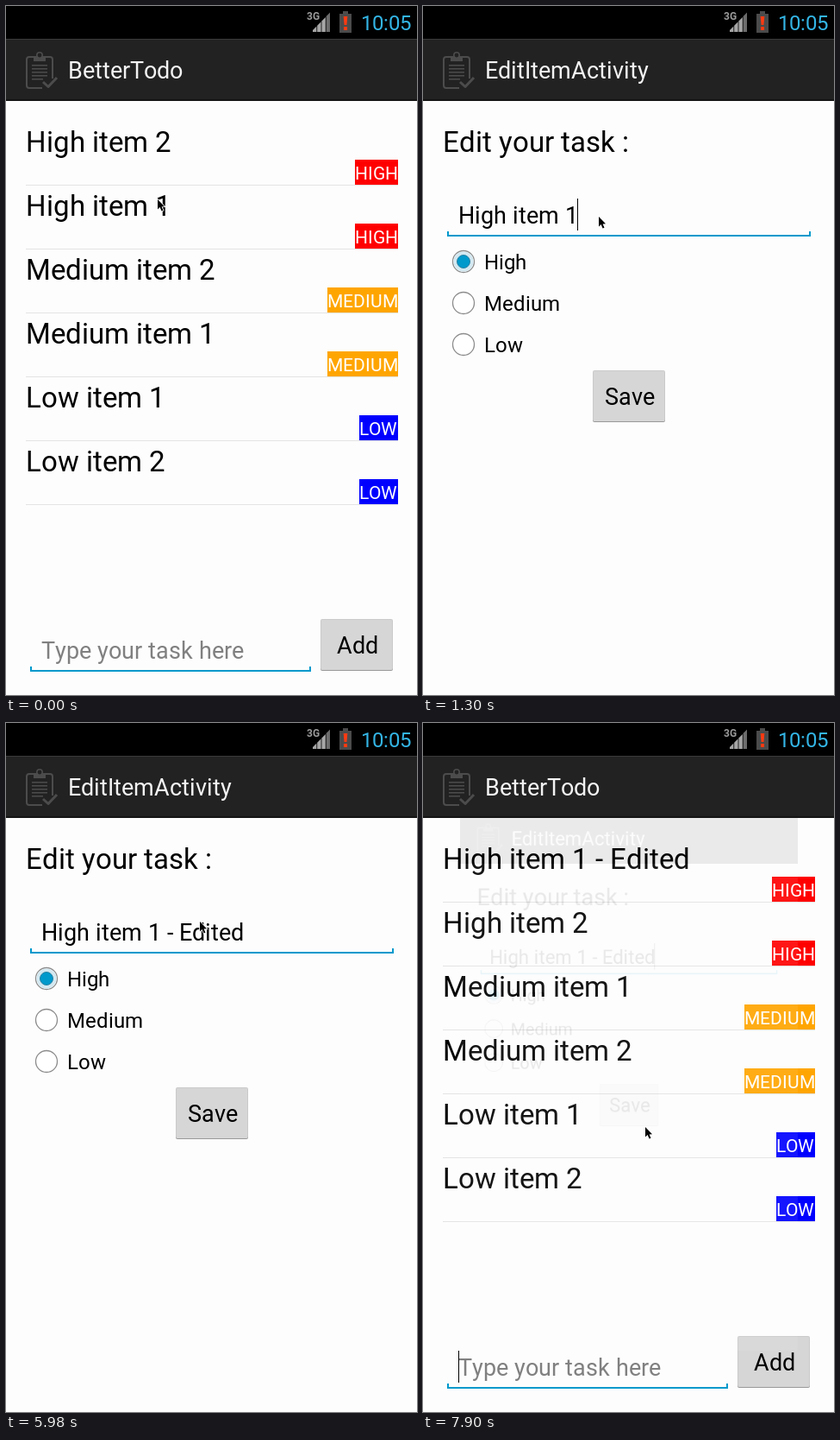
Recreate the animation shown at these times as an HTML page with a canvas. Size 477 by 798 pixels, loop 7.99 s.

```html
<!DOCTYPE html>
<html lang="en">
<head>
<meta charset="utf-8">
<title>Todo app</title>
<style>
html, body { margin: 0; width: 100%; height: 100%; overflow: hidden; background: #000; }
canvas { display: block; }
</style>
</head>
<body>
<canvas id="stage" width="477" height="798"></canvas>
<script>
const LOOP = 7990;
const BLUE = '#0099cc', PAPER = '#fdfdfd';
const stage = document.getElementById('stage').getContext('2d');

// The app window is slightly larger than the visible stage.
const sheet = document.createElement('canvas');
sheet.width = 480;
sheet.height = 800;
const sheetCtx = sheet.getContext('2d');

const FULL = 'High item 1 - Edited';
const TYPED = [[2960, 12], [3280, 13], [3490, 14], [3890, 15], [4480, 16],
  [5040, 17], [5190, 18], [5300, 19], [5460, 20]];
const BLINK_STARTS = [1040, 2480, ...TYPED.map(k => k[0])];

const BADGES = {
  High: { color: '#ff0000', x: 405 },
  Medium: { color: '#ffa500', x: 373 },
  Low: { color: '#0000ff', x: 410 }
};
const BEFORE = ['High item 2', 'High item 1', 'Medium item 2', 'Medium item 1', 'Low item 1', 'Low item 2'];
const AFTER = [FULL, 'High item 2', 'Medium item 1', 'Medium item 2', 'Low item 1', 'Low item 2'];

// time, x, y
const POINTER = [[0, 176, 224], [1095, 176, 224], [1300, 204, 244], [1720, 204, 244],
  [1810, 206, 244], [2020, 206, 244], [2230, 209, 245], [2470, 209, 245],
  [2580, 225, 230], [6240, 225, 230]];
const SWEEP = [[225, 230], [310, 258], [376, 330], [391, 425], [374, 494], [312, 493], [258, 468]];

const within = (t, a, b) => t >= a && t < b;
const clamp = v => Math.max(0, Math.min(1, v));

function rect(c, color, x, y, w, h) {
  c.fillStyle = color;
  c.fillRect(x, y, w, h);
}

// Hinted text: every glyph advances by a whole number of pixels.
function advances(c, str, size, weight = 400) {
  c.font = `${weight} ${size}px Roboto, sans-serif`;
  return [...str].map(ch => Math.round(c.measureText(ch).width));
}

function text(c, str, x, y, size, color = '#000', weight = 400) {
  const steps = advances(c, str, size, weight);
  c.fillStyle = color;
  [...str].forEach((ch, i) => {
    c.fillText(ch, x, y);
    x += steps[i];
  });
  return x;
}

function shape(c, points, fill) {
  c.beginPath();
  points.forEach(([x, y]) => c.lineTo(x, y));
  c.closePath();
  c.fillStyle = fill;
  c.fill();
}

function box(c, color, x, y, w, h, r) {
  c.beginPath();
  c.roundRect(x, y, w, h, r);
  c.fillStyle = color;
  c.fill();
}

function disc(c, x, y, r, fill, stroke, width = 1) {
  c.beginPath();
  c.arc(x, y, r, 0, Math.PI * 2);
  if (fill) { c.fillStyle = fill; c.fill(); }
  if (stroke) { c.strokeStyle = stroke; c.lineWidth = width; c.stroke(); }
}

function statusBar(c) {
  rect(c, '#000', 0, 0, 477, 38);
  text(c, '3G', 349, 16, 12, '#9a9a9a', 700);
  for (let i = 0; i < 4; i++) {
    const x = 356 + i * 5.2, h = 2 + i * 5.3;
    shape(c, [[x, 30], [x, 30 - h], [x + 4.4, 30 - h - 4.5], [x + 4.4, 30]], i < 3 ? '#a6a6a6' : '#6c6c6c');
  }
  rect(c, '#4b4b4b', 391, 6, 6, 4);
  rect(c, '#4b4b4b', 387, 9, 14, 22);
  shape(c, [[391.7, 12], [396.3, 12], [395.4, 22], [392.6, 22]], '#ff3a12');
  rect(c, '#ff3a12', 392, 24, 4, 4);
  text(c, '10:05', 412, 28, 24, '#33b5e5');
}

function clipboard(c) {
  c.strokeStyle = '#4c4c4c';
  c.lineWidth = 2;
  c.lineJoin = 'round';
  c.beginPath();
  c.moveTo(42, 95);
  c.lineTo(27, 95);
  c.quadraticCurveTo(24, 95, 24, 92);
  c.lineTo(24, 62);
  c.quadraticCurveTo(24, 59, 27, 59);
  c.lineTo(51, 59);
  c.quadraticCurveTo(54, 59, 54, 62);
  c.lineTo(54, 84);
  c.stroke();
  rect(c, '#4c4c4c', 32, 58, 14, 6);
  disc(c, 39, 57, 3.2, '#222', '#4c4c4c', 1.6);
  for (let y = 68; y <= 84; y += 4) rect(c, '#4c4c4c', 30, y, y > 82 ? 13 : 18, 1.5);
  c.lineWidth = 3;
  c.beginPath();
  c.moveTo(43, 88);
  c.lineTo(49, 93.5);
  c.lineTo(59, 83);
  c.stroke();
}

function page(c, title) {
  rect(c, PAPER, -1, 38, 480, 762);
  rect(c, '#222', -1, 38, 480, 72);
  rect(c, '#3a3a3a', -1, 38, 480, 1);
  rect(c, '#151515', -1, 108, 480, 2);
  clipboard(c);
  text(c, title, 72, 84, 27, '#f3f3f3');
}

function underline(c, left, right, bottom, focused) {
  const w = focused ? 2 : 1, color = focused ? BLUE : '#a8a8a8';
  rect(c, color, left, bottom - w, right - left, w);
  rect(c, color, left, bottom - 6, w, 6);
  rect(c, color, right - w, bottom - 6, w, 6);
}

function button(c, label, x, y, pressed) {
  if (pressed) box(c, 'rgba(51,181,229,.45)', x - 5, y - 4, 94, 69, 4);
  box(c, '#999', x, y + 2, 84, 58, 2);
  box(c, '#cacaca', x, y, 84, 59, 2);
  box(c, pressed ? '#a9cfdf' : '#d6d6d6', x + 1, y + 1, 82, 58, 1);
  const width = advances(c, label, 27).reduce((a, b) => a + b);
  text(c, label, Math.round(x + 42.5 - width / 2), y + 40, 27);
}

function listPage(c, items, { pressed, caret, focused }) {
  page(c, 'BetterTodo');
  items.forEach((item, i) => {
    const base = 169 + i * 74, line = 207 + i * 74;
    const level = item.split(' ')[0], badge = BADGES[level];
    if (pressed && i === 1) rect(c, 'rgba(51,181,229,.5)', 23, line - 73, 432, 73);
    text(c, item, 23, base, 33);
    rect(c, '#e4e4e4', 23, line, 432, 1);
    rect(c, badge.color, badge.x, line - 29, 455 - badge.x, 29);
    text(c, level.toUpperCase(), badge.x, line - 6, 21, '#fff');
  });
  text(c, 'Type your task here', 41, 756, 27, '#808080');
  underline(c, 28, 354, 771, focused);
  if (caret) rect(c, '#000', 41, 727, 1, 37);
  button(c, 'Add', 365, 710);
}

function handle(c, x, alpha) {
  c.save();
  c.globalAlpha *= alpha;
  shape(c, [[x, 265], [x + 16, 283], [x + 16, 318], [x - 16, 318], [x - 16, 283]], '#33b5e5');
  c.restore();
}

function radio(c, label, y, on) {
  disc(c, 47, y, 12.5, '#fff', '#8c8c8c', 1.3);
  if (on) {
    disc(c, 47, y, 11.5, '#d3e8f1');
    disc(c, 47, y, 7.5, BLUE, '#2a83a3', 1);
  }
  text(c, label, 71, y + 9, 24);
}

function editPage(c, t) {
  page(c, 'EditItemActivity');
  text(c, 'Edit your task :', 23, 169, 33);
  const key = TYPED.filter(k => k[0] <= t).pop();
  const caretX = text(c, FULL.slice(0, key ? key[1] : 11), 41, 252, 27) - 1;
  const since = t - (BLINK_STARTS.filter(s => s <= t).pop() ?? t);
  underline(c, 28, 450, 267, true);
  ['High', 'Medium', 'Low'].forEach((label, i) => radio(c, label, 296 + i * 48, i === 0));
  button(c, 'Save', 197, 422, within(t, 7400, 7510));
  if (Math.floor(since / 500) % 2 === 0 || t >= 7690) rect(c, '#000', caretX, 223, 1, 37);
  if (within(t, 2710, 3060)) handle(c, 179.5, clamp((3060 - t) / 100));
}

// How far the edit window has opened, 0 to 1.
function openness(t) {
  if (t < 710) return 0;
  if (t < 860) return 0.2;
  if (t < 1050) return 0.48;
  if (t < 1095) return 0.85;
  if (t < 7690) return 1;
  return 0.75 - Math.min(3, Math.floor((t - 7690) / 70)) * 0.222;
}

function spline(points, u) {
  const n = points.length - 1, s = clamp(u) * n;
  const i = Math.min(n - 1, Math.floor(s)), f = s - i;
  const at = k => points[Math.max(0, Math.min(n, k))];
  return [0, 1].map(d => {
    const [a, b, e, g] = [at(i - 1)[d], at(i)[d], at(i + 1)[d], at(i + 2)[d]];
    return b + 0.5 * f * (e - a + f * (2 * a - 5 * b + 4 * e - g + f * (3 * (b - e) + g - a)));
  });
}

function pointerAt(t) {
  if (t >= 6240) return spline(SWEEP, (t - 6240) / 790);
  const i = POINTER.findIndex(k => k[0] > t);
  const a = POINTER[i - 1], b = POINTER[i], f = (t - a[0]) / (b[0] - a[0]);
  return [a[1] + (b[1] - a[1]) * f, a[2] + (b[2] - a[2]) * f];
}

function pointer(c, t) {
  const [x, y] = pointerAt(t).map(Math.round);
  const clicking = within(t, 190, 430) || within(t, 2580, 2670) || within(t, 7340, 7510);
  c.save();
  c.translate(x, y);
  if (clicking) {
    disc(c, 0.5, 0.5, 9, null, '#fff', 1);
    disc(c, 0.5, 0.5, 10, null, '#111', 1);
  }
  c.strokeStyle = '#fff';
  c.lineWidth = 1.6;
  c.lineJoin = 'miter';
  const arrow = [[0, 0], [0, 11.5], [2.6, 9], [4.6, 13.6], [6.5, 12.7], [4.6, 8.4], [8, 8.2]];
  shape(c, arrow, '#000');
  c.stroke();
  shape(c, arrow, '#000');
  c.restore();
}

function draw(t) {
  const c = stage, p = openness(t), closing = t >= 7690;
  if (p < 1) {
    listPage(c, closing ? AFTER : BEFORE, {
      pressed: within(t, 270, 510),
      caret: t >= 350,
      focused: closing || t < 510
    });
    if (!closing) rect(c, `rgba(0,0,0,${0.2 * p})`, 0, 38, 477, 760);
  }
  if (p > 0) {
    sheetCtx.setTransform(1, 0, 0, 1, 0, 0);
    sheetCtx.clearRect(0, 0, 480, 800);
    sheetCtx.translate(1, 0);
    editPage(sheetCtx, t);
    const s = 0.8 + 0.2 * p;
    c.save();
    c.globalAlpha = p;
    c.translate(239, 399);
    c.scale(s, s);
    c.drawImage(sheet, -240, -399);
    c.restore();
  }
  statusBar(c);
  pointer(c, t);
}

let start;
function tick(now) {
  start ??= now;
  draw((now - start) % LOOP);
  requestAnimationFrame(tick);
}
draw(0);
requestAnimationFrame(tick);
</script>
</body>
</html>
```
